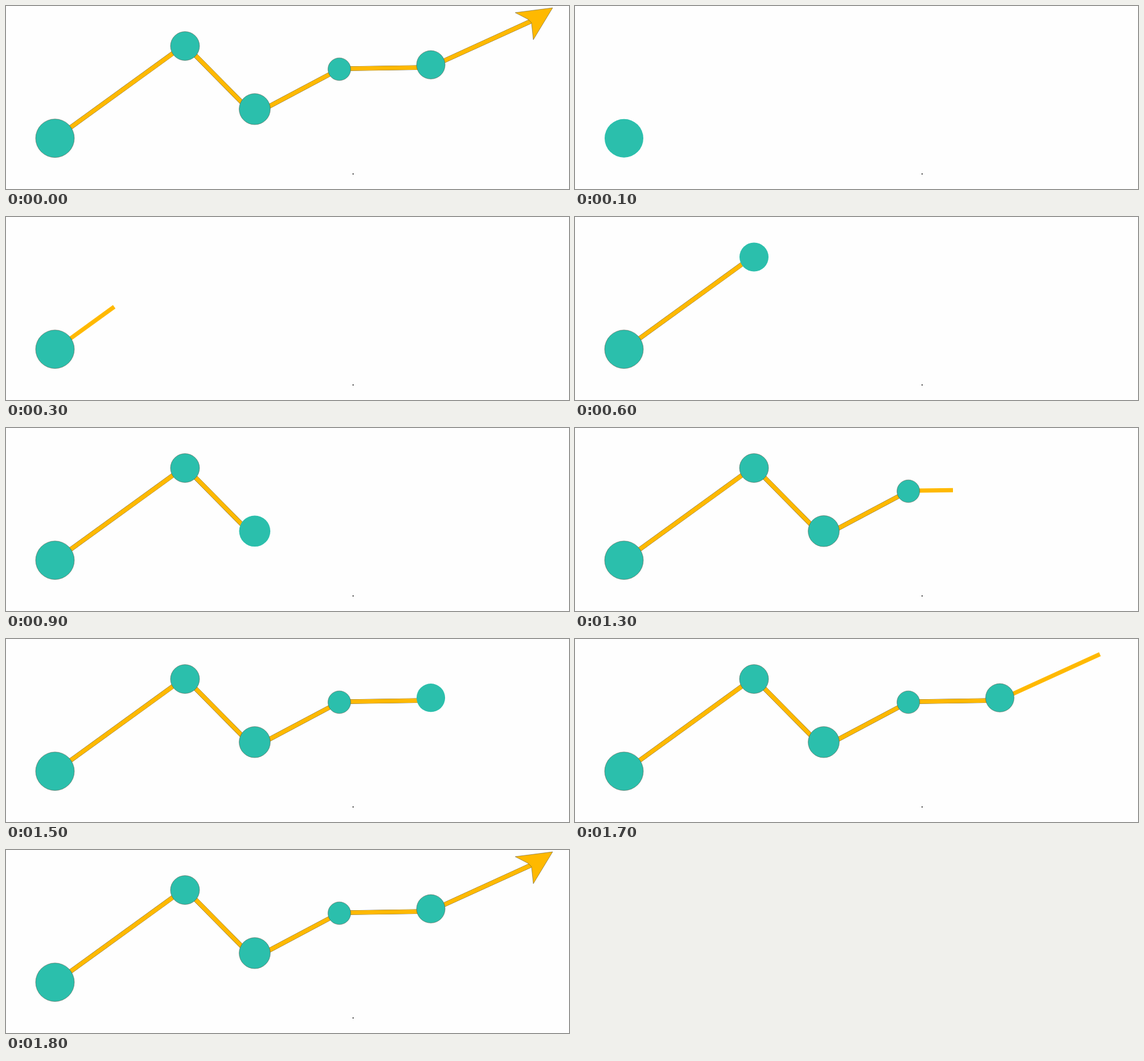
These frames come from a looping animation (931x304 px, 1.9 s). An HTML page with a canvas:

```html
<!DOCTYPE html>
<html lang="en">
<head>
<meta charset="utf-8">
<title>Growing line chart</title>
<style>
  html, body { margin: 0; height: 100%; overflow: hidden; background: #fefefe; }
  canvas { display: block; }
</style>
</head>
<body>
<canvas id="chart" width="931" height="304"></canvas>
<script>
const ctx = document.getElementById('chart').getContext('2d');
const STEP = 100, STEPS = 19;
const TEAL = '#2bbfac', AMBER = '#ffb900', EDGE = '#4c4a38';

// start: step of first appearance
const nodes = [
  { x: 81, y: 219.7, r: 32, start: 1 },
  { x: 296, y: 66.5, r: 24, start: 6 },
  { x: 411.3, y: 171.3, r: 25.8, start: 9 },
  { x: 551.2, y: 105, r: 18.8, start: 12 },
  { x: 702.5, y: 97.7, r: 23.6, start: 15 }
];

// grow: drawn fraction at each step from start on
const links = [
  { from: [105, 203], to: [277, 77.8], start: 2, grow: [0.15, 0.43, 0.72, 1] },
  { from: [312, 80.8], to: [390.4, 160.6], start: 7, grow: [0.5, 1] },
  { from: [434, 167.4], to: [535, 113.5], start: 10, grow: [0.5, 1] },
  { from: [568, 104], to: [682, 102.3], start: 13, grow: [0.5, 1] },
  { from: [722, 92.1], to: [868, 25.2], start: 16, grow: [0.5, 1] }
];

const head = { points: [[842, 11], [904, 3], [872, 56], [869, 28], [864, 22.5]], start: 18 };

function line(x1, y1, x2, y2, width, color) {
  ctx.beginPath();
  ctx.moveTo(x1, y1);
  ctx.lineTo(x2, y2);
  ctx.lineWidth = width;
  ctx.strokeStyle = color;
  ctx.stroke();
}

function drawLink({ from: [x1, y1], to: [x2, y2], start, grow }, step) {
  const age = step - start;
  if (age < 0) return;
  const k = grow[Math.min(age, grow.length - 1)];
  const x = x1 + (x2 - x1) * k, y = y1 + (y2 - y1) * k;
  if (age >= grow.length) line(x1, y1, x, y, 7.6, EDGE);
  line(x1, y1, x, y, 7, AMBER);
}

function fillShape(color, outlined) {
  ctx.fillStyle = color;
  ctx.fill();
  if (!outlined) return;
  ctx.lineWidth = 0.5;
  ctx.strokeStyle = EDGE;
  ctx.stroke();
}

function drawNode({ x, y, r, start }, step) {
  if (step < start) return;
  ctx.beginPath();
  ctx.arc(x, y, r, 0, Math.PI * 2);
  fillShape(TEAL, step > start);
}

function drawHead(step) {
  if (step < head.start) return;
  ctx.beginPath();
  head.points.forEach(([x, y]) => ctx.lineTo(x, y));
  ctx.closePath();
  fillShape(AMBER, true);
}

function frame(now) {
  // The finished chart also opens the loop.
  const step = Math.floor(now / STEP) % STEPS || STEPS - 1;
  ctx.fillStyle = '#fefefe';
  ctx.fillRect(0, 0, 931, 304);
  links.forEach(link => drawLink(link, step));
  drawHead(step);
  nodes.forEach(node => drawNode(node, step));
  ctx.fillStyle = '#555';
  ctx.fillRect(573, 278, 2, 2);
  requestAnimationFrame(() => frame(performance.now() - origin));
}

const origin = performance.now();
frame(0);
</script>
</body>
</html>
```
